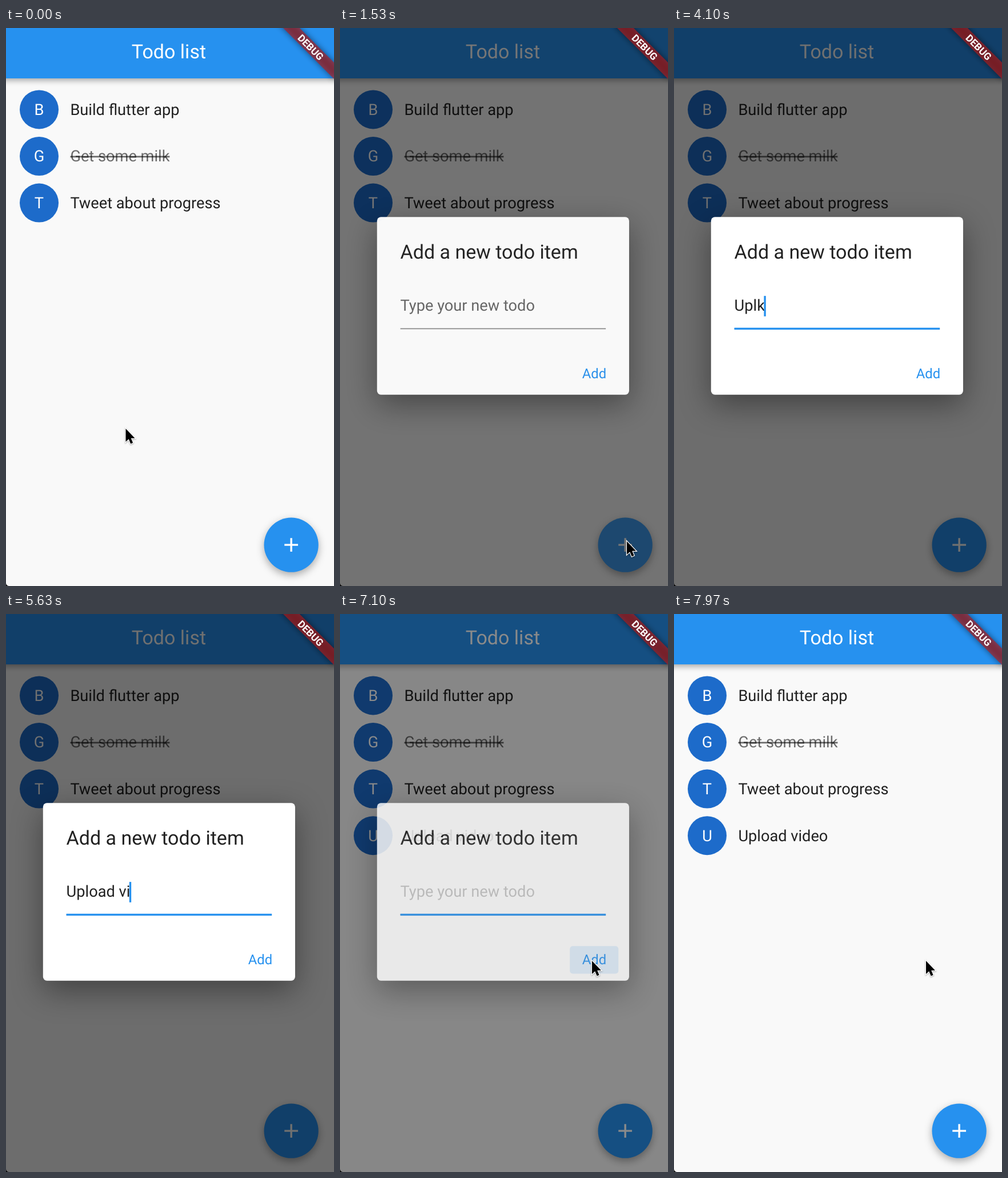
Recreate the animation shown at these times as an HTML page. Size 574 by 975 pixels, loop 8 s.

```html
<!DOCTYPE html>
<html lang="en">
<head>
<meta charset="utf-8">
<title>Todo list</title>
<style>
  html, body { margin: 0; width: 100%; height: 100%; overflow: hidden; background: #fafafa; }
  svg { display: block; width: 100vw; height: 100vh; }
  text { font: 16px Roboto, sans-serif; white-space: pre; text-rendering: geometricPrecision; fill: rgba(0,0,0,.87); }
  .white { fill: #fff; }
  .mid { text-anchor: middle; }
  .large { font-size: 20px; }
  .done { fill: rgba(0,0,0,.57); text-decoration: line-through; }
  .hint { fill: rgba(0,0,0,.6); }
  .blue { fill: #2691ef; }
  .bar { filter: drop-shadow(0 2px 3px rgba(0,0,0,.35)); }
  .fab { filter: drop-shadow(0 3px 4px rgba(0,0,0,.32)); }
  .card { filter: drop-shadow(0 10px 16px rgba(0,0,0,.4)); }
  .ribbon-shadow { fill: rgba(0,0,0,.5); filter: blur(3px); }
</style>
</head>
<body>
<svg viewBox="0 0 574 975" preserveAspectRatio="none">
  <!-- The app is laid out in its own 339.5 x 579.5 units -->
  <g transform="translate(-3.2 -7.2) scale(1.7)">
    <rect width="345" height="585" fill="#f9f9f9"/>
    <rect class="blue bar" x="-10" y="-10" width="360" height="66"/>
    <text class="white mid large" x="169.5" y="35.3">Todo list</text>
    <g id="list"></g>
    <circle class="blue fab" cx="295.5" cy="535.5" r="28"/>
    <circle id="ripple" cx="295.5" cy="535.5" fill="#fff"/>
    <path d="M288.5 535.5h14M295.5 528.5v14" stroke="#fff" stroke-width="2"/>

    <rect id="barrier" width="345" height="585"/>
    <g id="dialog">
      <rect class="card" x="40" y="198.5" width="259.5" height="182.6" rx="4" fill="#fff"/>
      <text class="large" x="64" y="241.2">Add a new todo item</text>
      <text class="hint" id="hint" x="64" y="294.9">Type your new todo</text>
      <text id="input" x="64" y="294.9"></text>
      <rect x="64" y="312.8" width="211.5" height="1" fill="#888"/>
      <rect class="blue" id="focus" x="64" width="211.5"/>
      <rect class="blue" id="caret" y="279.6" width="2" height="21"/>
      <rect class="blue" id="highlight" x="238.5" y="345.5" width="50" height="28.5" rx="3"/>
      <text class="blue mid" x="263.6" y="364.5" style="font-size:14px">Add</text>
    </g>

    <g transform="translate(339.5 0) rotate(45)">
      <rect class="ribbon-shadow" x="-40" y="28" width="80" height="12"/>
      <rect x="-40" y="28" width="80" height="12" fill="#b71c1c" fill-opacity=".627"/>
      <text class="white mid" y="37.6" style="font-size:10.2px;font-weight:700">DEBUG</text>
    </g>
  </g>
  <path d="M0 970Q.5 974.5 5 975H0Z"/>
  <g id="arrow" style="filter:drop-shadow(0 1px 1px rgba(0,0,0,.35))">
    <path d="M0 0V23L5.2 18.2 8.7 26.4 12.6 24.7 9.2 16.7H16Z" stroke="#fff" stroke-width="2.4" paint-order="stroke"/>
  </g>
  <g id="beam" fill="none" stroke-linecap="round">
    <path id="beamShape" d="M-5-12Q0-12 0-8V8Q0 12-5 12M5-12Q0-12 0-8M0 8Q0 12 5 12M-3 3H3" stroke="#fff" stroke-width="4"/>
    <use href="#beamShape" style="stroke:#000"/>
    <path d="M-5-12Q0-12 0-8V8Q0 12-5 12M5-12Q0-12 0-8M0 8Q0 12 5 12M-3 3H3" stroke="#000" stroke-width="2"/>
  </g>
</svg>
<script>
const LOOP = 8000, OPEN = 1410, FOCUS = 2520, CLOSE = 7037, FADE = 150;
const el = {};
document.querySelectorAll('[id]').forEach(node => el[node.id] = node);

const items = ['Build flutter app', 'Get some milk', 'Tweet about progress', 'Upload video'];
el.list.innerHTML = items.map((label, i) => `
  <g transform="translate(0 ${88 + 48 * i})">
    <circle cx="36" r="20" fill="#1d6bca"/>
    <text class="white mid" x="36" y="5.5">${label[0]}</text>
    <text class="${i === 1 ? 'done' : ''}" x="68" y="5.5">${label}</text>
  </g>`).join('');
const newItem = el.list.lastElementChild;

// [time, text in the field from then on]
const typed = [
  [FOCUS, ''], [3300, 'U'], [3550, 'Up'], [3780, 'Upl'], [3980, 'Uplk'], [4240, 'Upl'],
  [4660, 'Uplo'], [4800, 'Uploa'], [4960, 'Upload'], [5130, 'Upload '], [5330, 'Upload v'],
  [5500, 'Upload vi'], [5690, 'Upload vid'], [5820, 'Upload vide'], [5960, 'Upload video'], [CLOSE, '']
];
// [start, end, x, y]: the pointer glides to x, y between start and end
const moves = [[0, 0, 209.5, 700], [380, 1120, 502, 897], [1850, 2450, 222, 490], [6300, 6700, 441, 606]];

const clamp = v => Math.max(0, Math.min(1, v));
const ramp = (t, start, length) => clamp((t - start) / length);
const smooth = p => p * p * (3 - 2 * p);
const easeOut = p => p * (2 - p);
const set = (node, attrs) => {
  for (const name in attrs) node.setAttribute(name, attrs[name]);
};
const show = (node, on) => set(node, { visibility: on ? 'visible' : 'hidden' });

function pointerAt(t) {
  let [, , x, y] = moves[0];
  for (const [start, end, toX, toY] of moves.slice(1)) {
    const p = smooth(ramp(t, start, end - start));
    x += (toX - x) * p;
    y += (toY - y) * p;
  }
  return [x, y];
}

function drawField(t) {
  const [keyTime, text] = typed.filter(([time]) => time <= t).pop() || [0, ''];
  el.input.textContent = text;
  const hint = t < 3300 ? 1 : t < CLOSE ? 1 - ramp(t, 3300, 150) : ramp(t, CLOSE, 170);
  set(el.hint, { opacity: hint });
  const focus = ramp(t, FOCUS, 200);
  set(el.focus, { y: 313.3 - focus, height: 2 * focus, opacity: focus });
  const width = text ? el.input.getComputedTextLength() : 0;
  set(el.caret, { x: 63.1 + width });
  show(el.caret, t >= FOCUS && t < CLOSE && (t - keyTime) % 1000 < 500);
}

function drawPointer(t) {
  const [x, y] = pointerAt(t);
  const hidden = t >= 3300 && t < 6300;
  const inField = t > OPEN && t < CLOSE && x > 105 && x < 465 && y > 462 && y < 527;
  const transform = `translate(${x} ${y})`;
  set(el.arrow, { transform });
  set(el.beam, { transform });
  show(el.arrow, !hidden && !inField);
  show(el.beam, !hidden && inField);
}

function draw(t) {
  const shown = Math.min(ramp(t, OPEN, FADE), 1 - ramp(t, CLOSE, FADE));
  set(el.dialog, { opacity: easeOut(shown) });
  set(el.barrier, { opacity: .56 * easeOut(shown) });
  show(newItem, t >= CLOSE);
  const press = ramp(t, 1300, 200);
  set(el.ripple, { r: 28 * easeOut(press), opacity: .16 * (1 - ramp(t, 1450, 250)) });
  set(el.highlight, { opacity: .04 * ramp(t, 6600, 60) + .1 * ramp(t, 6900, 120) });
  drawField(t);
  drawPointer(t);
}

const started = performance.now();
function tick() {
  draw((performance.now() - started) % LOOP);
  requestAnimationFrame(tick);
}
tick();
</script>
</body>
</html>
```
